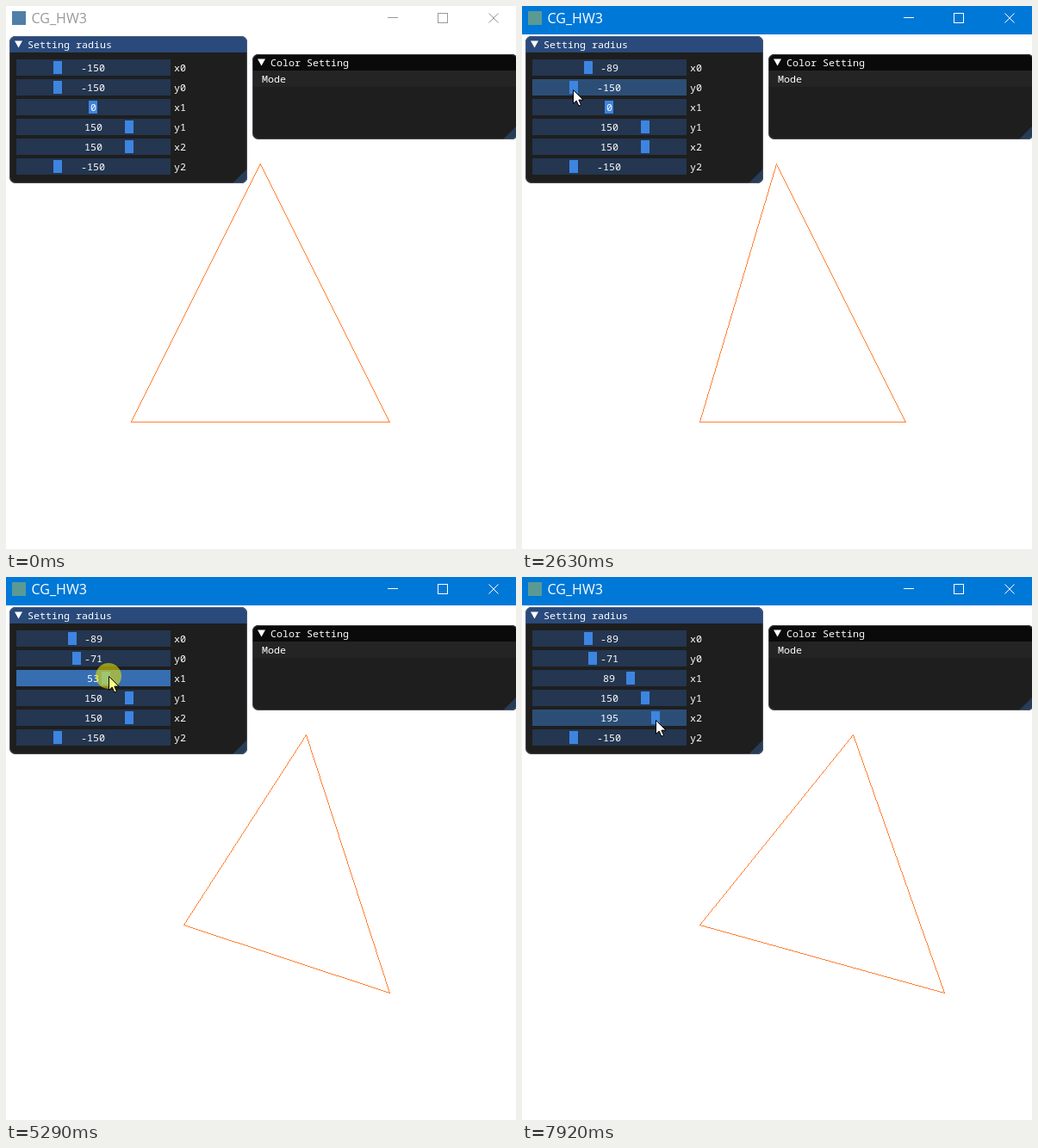
Animation, 592 px wide and 631 px high, one loop 8000 ms. Source, as an HTML page with a canvas:

```html
<!DOCTYPE html>
<html lang="en">
<head>
<meta charset="utf-8">
<title>CG_HW3</title>
<style>
html, body { margin: 0; width: 592px; height: 631px; overflow: hidden; background: #fff; }
canvas { display: block; }
</style>
</head>
<body>
<canvas id="stage" width="592" height="631"></canvas>
<script>
const ctx = document.getElementById('stage').getContext('2d');
const LOOP = 8000, APPEAR = 120, FOCUS = 1300;
const TICK = 78;   // screen refresh
const LEAD = 32;   // the pointer runs this far ahead of the sliders
const MONO = '11.667px "Noto Sans Mono", "Liberation Mono", monospace';
const TITLE = '16px "Open Sans", "Noto Sans", sans-serif';

const names = ['x0', 'y0', 'x1', 'y1', 'x2', 'y2'];
const initial = [-150, -150, 0, 150, 150, -150];

// Pointer stops: it arrives at `near` and leaves at `up`.
// From `down` on it drags the slider there through the values of `path`.
const stops = [
  { x: 490, y: 540, near: APPEAR },
  { x: 450, y: 271, near: 200 },
  { x: 65, y: 78, near: 1130, up: 1250 },
  { y: 72, near: 1290, down: FOCUS, up: 2440, path: [[1300, -133], [1770, -150], [2320, -89]] },
  { y: 97, near: 2630, down: 2840, up: 4120, path: [[2840, -155], [3330, -191], [3470, -191], [4100, -71]] },
  { y: 115, near: 4590, down: 4800, up: 5740, path: [[4800, -16], [5060, -42], [5500, 89]] },
  { x: 138, y: 142, near: 6010, up: 6220 },
  { y: 163, near: 6450, down: 6750, up: 7820, path: [[6750, 136], [6895, 136], [7100, 109], [7160, 109], [7610, 195]] },
  { x: 155, y: 166, near: 7900, up: LOOP }
];

const mix = (a, b, u) => a + (b - a) * u;
const easeOut = u => 1 - (1 - u) ** 2;
const sliderX = v => 101.5 + v * .275;
const rowAt = y => Math.floor((y - 62) / 23);

function valueAt(path, t) {
  const i = path.findIndex(k => k[0] > t);
  if (i < 0) return path[path.length - 1][1];
  if (i === 0) return path[0][1];
  const [a, b] = [path[i - 1], path[i]];
  return mix(a[1], b[1], easeOut((t - a[0]) / (b[0] - a[0])));
}

function pointerAt(t) {
  const spot = s => [s.path ? sliderX(valueAt(s.path, t)) : s.x, s.y];
  const i = stops.findLastIndex(s => s.near <= t);
  const here = stops[i], next = stops[i + 1], leave = here.up || here.near;
  const a = spot(here);
  if (t < leave || !next) return a;
  const b = spot(next), u = (t - leave) / (next.near - leave);
  return [mix(a[0], b[0], u), mix(a[1], b[1], u)];
}

function box(x, y, w, h, color) {
  ctx.fillStyle = color;
  ctx.fillRect(x, y, w, h);
}

function shape(points, color) {
  ctx.beginPath();
  for (const [x, y] of points) ctx.lineTo(x, y);
  ctx.closePath();
  ctx.fillStyle = color;
  ctx.fill();
}

function label(s, x, y, color = '#fff', font = MONO) {
  ctx.font = font;
  ctx.fillStyle = color;
  ctx.fillText(s, x, y);
}

// One pixel wide line without smoothing
function line([x0, y0], [x1, y1]) {
  const n = Math.max(Math.abs(x1 - x0), Math.abs(y1 - y0), 1);
  for (let i = 0; i <= n; i++)
    ctx.fillRect(Math.ceil(mix(x0, x1, i / n) - .5), Math.round(mix(y0, y1, i / n)), 1, 1);
}

function titleBar(active) {
  const ink = active ? '#fff' : '#999';
  box(0, 0, 592, 33, active ? '#0078d7' : '#fff');
  box(7, 6, 16, 16, active ? '#5b9a94' : '#4f7fa8');
  label('CG_HW3', 29.5, 20, ink, TITLE);
  box(443, 13, 12, 1, ink);
  ctx.strokeStyle = ink;
  ctx.lineWidth = 1;
  ctx.strokeRect(501.5, 8.5, 11, 11);
  ctx.beginPath();
  ctx.moveTo(560.5, 8.5); ctx.lineTo(571.5, 19.5);
  ctx.moveTo(571.5, 8.5); ctx.lineTo(560.5, 19.5);
  ctx.stroke();
}

function panel(x, y, w, h, name, head, menu) {
  const r = x + w, b = y + h;
  ctx.save();
  ctx.beginPath();
  ctx.roundRect(x, y, w, h, 7);
  ctx.clip();
  box(x, y, w, h, '#1e1e1e');
  box(x, y, w, 19, head);
  if (menu) {
    box(x, y + 19, w, 19, '#242424');
    label(menu, x + 11, y + 33);
  }
  shape([[r, b - 17], [r, b], [r - 17, b]], '#273c55');
  ctx.restore();
  ctx.beginPath();
  ctx.roundRect(x + .5, y + .5, w - 1, h - 1, 7);
  ctx.strokeStyle = 'rgba(110,110,128,.5)';
  ctx.lineWidth = 1;
  ctx.stroke();
  shape([[x + 6, y + 5.6], [x + 15, y + 5.6], [x + 10.5, y + 13.4]], '#fff');
  label(name, x + 21, y + 14);
}

function slider(row, value, hot, down) {
  const y = 62 + row * 23, s = String(value);
  box(12, y, 179, 19, !hot ? '#243650' : down ? '#366eb1' : '#2c4e76');
  box(Math.round(sliderX(value) - 5.1), y + 2, 10, 15, hot && down ? '#4296fa' : '#3d85e0');
  label(s, Math.floor(101.5 - s.length * 3.5), y + 14);
  label(names[row], 195, y + 14);
}

function arrow(x, y, down) {
  if (down) {
    ctx.beginPath();
    ctx.arc(x, y, 15, 0, Math.PI * 2);
    ctx.fillStyle = 'rgba(240,235,0,.55)';
    ctx.fill();
  }
  const tip = [[0, 0], [0, 16], [3.7, 12.6], [6.4, 18.6], [9, 17.5], [6.4, 11.6], [11.5, 11.6]];
  shape(tip.map(([a, b]) => [x + .5 + a, y + .5 + b]), down ? '#ffff8c' : '#fff');
  ctx.strokeStyle = '#000';
  ctx.lineWidth = 1;
  ctx.stroke();
}

function draw(now) {
  const t = APPEAR + Math.floor((now - APPEAR) / TICK) * TICK;
  const focused = t >= FOCUS - TICK / 2;
  const visible = t >= APPEAR;
  const down = stops.some(s => s.down <= t && t < s.up);
  const hot = focused ? rowAt(pointerAt(t)[1]) : -1;

  const v = [...initial];
  for (const s of stops)
    if (s.down <= t) v[rowAt(s.y)] = Math.round(valueAt(s.path, t));
  const corner = i => [295 + v[i], 333 - v[i + 1]];

  box(0, 0, 592, 631, '#fff');
  ctx.fillStyle = '#ff8033';
  line(corner(0), corner(2));
  line(corner(2), corner(4));
  line(corner(4), corner(0));

  titleBar(focused);
  panel(4, 35, 276, 171, 'Setting radius', '#294a7a');
  panel(286, 56, 308, 99, 'Color Setting', '#0a0a0a', 'Mode');
  v.forEach((value, i) => slider(i, value, i === hot, down));
  if (visible) {
    const [x, y] = pointerAt(t + LEAD);
    arrow(Math.round(x), Math.round(y), down);
  }
}

const start = performance.now();
function frame() {
  draw((performance.now() - start) % LOOP);
  requestAnimationFrame(frame);
}
frame();
</script>
</body>
</html>
```
